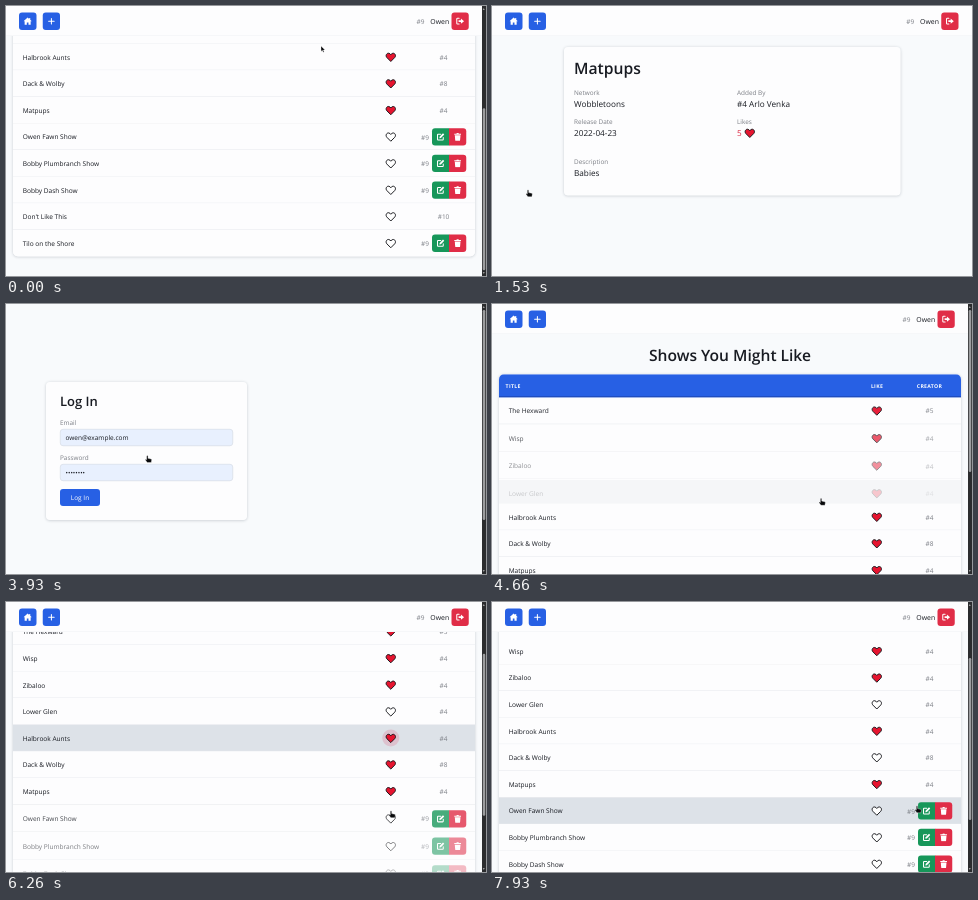
These frames come from a looping animation (480x270 px, 8000 ms). An HTML page:

```html
<!DOCTYPE html>
<html lang="en">
<head>
<meta charset="utf-8">
<title>Shows</title>
<style>
  html, body { margin: 0; width: 100%; height: 100%; overflow: hidden; }
  #stage { position: relative; width: 480px; height: 270px; overflow: hidden; background: #f8fafc; }
  /* Laid out large and shrunk, so that edges and glyphs keep fractional positions. */
  #scene { left: 0; top: 0; width: 480px; height: 270px; zoom: 4; transform: scale(.25); transform-origin: 0 0;
    font-family: "Open Sans", "Noto Sans", sans-serif; color: #181b22; text-rendering: geometricPrecision; }
  #stage div, #stage span, #stage svg { position: absolute; box-sizing: border-box; }
  #stage span { white-space: nowrap; line-height: 1; transform: translateY(-50%); }
  #stage span.mid { transform: translate(-50%, -50%); }
  .page { inset: 0; }
  .grey { color: #7b7e85; }
  .strong { font-weight: 600; }
  .head { color: #fff; font-weight: 700; letter-spacing: .3px; }
  #header { left: 0; top: 0; width: 100%; height: 30px; background: #fdfdfe;
    border-bottom: .5px solid #eef0f3; box-shadow: 0 .4px 1.5px rgba(0, 0, 0, .05); }
  .btn { width: 17.3px; height: 17.3px; border-radius: 3px; color: #fff; }
  .btn svg { left: 4.5px; top: 4.5px; width: 8.3px; height: 8.3px; }
  .blue { background: #2760e4; }
  .red { background: #e02d47; }
  .green { background: #17975a; }
  #logout.hot { background: #ae213b; box-shadow: 0 0 0 1px rgba(225, 45, 70, .4); }
  #tip { left: 445.5px; top: 23.3px; width: 25px; height: 11.2px; border-radius: 2px; background: #0b0e1a; }
  .card { background: #fdfdfe; border-radius: 4px; box-shadow: 0 .5px 3px rgba(20, 30, 50, .22); }
  #table { left: 7px; top: 70.3px; width: 462px; height: 342.2px; border-radius: 5px; overflow: hidden; }
  #thead { left: 0; top: 0; width: 462px; height: 23px; background: #2760e4; border-bottom: 1px solid #1c47b4; }
  .row { left: 0; width: 462px; height: 26.6px; background: #fdfdfe; border-bottom: .5px solid #e4e7eb; }
  .row.hover { background: #dde2e8; }
  .ring { left: 369.3px; top: 4.9px; width: 17px; height: 17px; border-radius: 50%; background: rgba(225, 29, 72, .16); }
  .heart { width: 10.6px; height: 10.6px; overflow: visible; }
  .heart path { stroke: #15161a; stroke-width: 2.2; stroke-linejoin: round; }
  .field { background: #fff; border: .6px solid #ccd2da; border-radius: 3px; }
  .field.filled { background: #e8f0fe; }
  #track { right: 0; top: 0; width: 4px; height: 270px; background: #2b2c2e; }
  #track i { position: absolute; left: .8px; top: 2px; border: 1.2px solid transparent; border-top: 0; border-bottom: 2px solid #a0a0a0; }
  #track i + i { top: auto; bottom: 2px; border-bottom: 0; border-top: 2px solid #a0a0a0; }
  #thumb { left: .8px; width: 2.4px; border-radius: 1.2px; background: #9c9d9f; }
  #cursor { left: 0; top: 0; width: 8px; height: 10px; overflow: visible; }
  #cursor path { fill: #08090b; stroke: #fff; stroke-width: .35; }
</style>
</head>
<body>
<div id="stage"><div id="scene"></div></div>
<script>
const LOOP = 8000, FRAME = 1000 / 15, PITCH = 26.6, FIRST = 93.3;
const DETAIL = 1500, LOGIN = 3200, LIST = 4270;
const FADES = [LIST, 5235, 7850], FADE_TIME = 420, STAGGER = 100;

// title, creator, liked, owned by the visitor, time of unliking
const shows = [
  ["The Hexward", 5, 1], ["Wisp", 4, 1], ["Zibaloo", 4, 1], ["Lower Glen", 4, 1, 0, FADES[1]],
  ["Halbrook Aunts", 4, 1], ["Dack & Wolby", 8, 1, 0, FADES[2]], ["Matpups", 4, 1],
  ["Owen Fawn Show", 9, 0, 1], ["Bobby Plumbranch Show", 9, 0, 1], ["Bobby Dash Show", 9, 0, 1],
  ["Don't Like This", 10, 0], ["Tilo on the Shore", 9, 0, 1]
];

// time, x, y of the pointer tip
const pointerPath = [
  [0, 315, 40], [60, 315, 40], [450, 305, 201], [1000, 305, 201], [1400, 36, 184], [1560, 36, 184],
  [1800, 95, 186], [2550, 462, 14.5], [3150, 462, 14.5], [3600, 180, 131], [3800, 180, 131],
  [4130, 72, 189], [4270, 72, 189], [4660, 329, 194.5], [5000, 384, 186], [5230, 384, 186],
  [5550, 385, 209], [6420, 385, 209], [6850, 386, 163], [7300, 386, 163], [7920, 425, 204]
];
const scrollPath = [[0, 162], [560, 162], [1040, 81], [4260, 81], [LIST, 0], [5650, 0],
  [5800, 21.7], [6060, 64], [6380, 84]];
// Hover is only refreshed now and then while the page scrolls.
const hoverScroll = [[0, 162], [500, 142], [1040, 81], [LIST, 0], [6380, 84]];
const arrowSpans = [[0, 400], [1560, 2480], [3250, 3550], [4300, 4400]];

const text = (x, y, size, str, cls = "") =>
  `<span class="${cls}" style="left:${x}px;top:${y}px;font-size:${size}px">${str.replace("&", "&amp;")}</span>`;
const box = (x, y, w, h, cls, inner = "", id = "") =>
  `<div id="${id}" class="${cls}" style="left:${x}px;top:${y}px;width:${w}px;height:${h}px">${inner}</div>`;
const icons = {
  home: '<path fill="currentColor" d="M8 1 0 8.2h2.2V15h4.2v-4.6h3.2V15h4.2V8.2H16L13 5.5V2h-2v1.7z"/>',
  plus: '<path d="M8 2.7v10.6M2.7 8h10.6" stroke="currentColor" stroke-width="2" stroke-linecap="round"/>',
  exit: '<path d="M6 2.5H3Q1.5 2.5 1.5 4v8q0 1.5 1.5 1.5h3" fill="none" stroke="currentColor" stroke-width="2" stroke-linecap="round"/><path fill="currentColor" d="M5 6.3h4.5V3L15.5 8l-6 5V9.7H5z"/>',
  edit: '<path d="M8 3H3Q2 3 2 4v9q0 1 1 1h9q1 0 1-1V9" fill="none" stroke="currentColor" stroke-width="2" stroke-linecap="round"/><path fill="currentColor" d="M6 7.5 12.500 1 15 3.500 8.500 10 5.500 10.500z"/>',
  trash: '<path fill="currentColor" d="M1.5 2H5.5L6.5.5h3l1 1.5h4v2h-13zM2.5 5h11l-.8 9.5q-.1 1-1.2 1h-7q-1.1 0-1.2-1z"/>'
};
const button = (x, y, color, icon, id = "", style = "") =>
  `<div id="${id}" class="btn ${color}" style="left:${x}px;top:${y}px;${style}"><svg viewBox="0 0 16 16">${icons[icon]}</svg></div>`;
const heart = (cx, cy, red) =>
  `<svg class="heart" viewBox="0 0 24 24" style="left:${cx - 5.3}px;top:${cy - 5.3}px"><path fill="${red ? "#e6142f" : "#fff"}" d="M12 21.5 3.2 12.7C-1 8 3 2 7.3 2.8 9.5 3.1 11 4.5 12 6.2c1-1.7 2.5-3.1 4.7-3.4C21 2 25 8 20.8 12.7z"/></svg>`;

const rowHtml = ([title, by, liked, own], i) => `<div class="row" style="top:${23 + i * PITCH}px">
  ${text(9.7, 13.5, 6.55, title)}<div class="ring"></div>${heart(377.7, 13.6, liked)}
  ${text(own ? 412 : 430.5, 13.5, 6.5, "#" + by, "grey mid")}
  ${own ? button(419, 4.7, "green", "edit", "", "border-radius:3px 0 0 3px") +
    button(436, 4.7, "red", "trash", "", "border-radius:0 3px 3px 0") : ""}</div>`;

const labelled = (x, y, label, value) => text(x, y, 6.4, label, "grey") + text(x, y + 11.6, 8.2, value);
const field = (y, label, id) => text(54, y - 6, 6.4, label, "grey") +
  box(54, y, 173, 17, "field", text(5, 8, 6.5, ""), id);

document.getElementById("scene").innerHTML = `
  <div class="page" id="list"><div class="page" id="scroller">
    ${text(238, 51.4, 15.6, "Shows You Might Like", "mid strong")}
    <div class="card" id="table">${shows.map(rowHtml).join("")}
      <div id="thead">${text(6.6, 11.7, 5.2, "TITLE", "head")}${text(378, 11.7, 5.2, "LIKE", "head mid")}${text(430.5, 11.7, 5.2, "CREATOR", "head mid")}</div>
    </div></div></div>
  <div class="page" id="detail">
    ${box(72, 41, 336.5, 148.5, "card")}
    ${text(82, 62, 15.7, "Matpups", "strong")}
    ${labelled(82, 86.3, "Network", "Wobbletoons")}${labelled(245, 86.3, "Added By", "#4 Arlo Venka")}
    ${labelled(82, 115.8, "Release Date", "2022-04-23")}${text(245, 115.8, 6.4, "Likes", "grey")}
    <span style="left:245px;top:127.4px;font-size:8.2px;color:#dc2640">5</span>${heart(257.8, 127.3, 1)}
    ${labelled(82, 155.6, "Description", "Babies")}
  </div>
  <div class="page" id="login">
    ${box(40, 78, 201, 138, "card")}
    ${text(54, 97, 13, "Log In", "strong")}
    ${field(125, "Email", "email")}${field(160, "Password", "password")}
    ${box(54, 185, 40, 17, "btn blue", text(20, 8.5, 6.5, "Log In", "mid"))}
  </div>
  <div id="header">
    ${button(13.1, 6.6, "blue", "home")}${button(36.8, 6.6, "blue", "plus")}
    <div id="account">${text(410.5, 15.3, 6.5, "#9", "grey")}${text(424.3, 15.3, 6.9, "Owen")}${button(445.4, 6.6, "red", "exit", "logout")}</div>
  </div>
  <div id="tip">${text(12.5, 5.5, 4.7, "Log Out", "mid head")}</div>
  <div id="track"><i></i><i></i><div id="thumb"></div></div>
  <svg id="cursor" viewBox="0 0 8 10">
    <path id="arrow" d="M0 0v5.4l1.3-1.1.9 2 1-.4-.9-1.9h1.7z"/>
    <path id="hand" d="M-.7.3Q0-.6.7.3V2.6l3 .7q.7.2.6 1L3.9 6.8H-.1L-2 4.3q-.2-.8.6-.7l.7.5z"/>
  </svg>`;

const $ = id => document.getElementById(id);
const rows = [...document.querySelectorAll(".row")].map(el => ({
  el, ring: el.querySelector(".ring"), fill: el.querySelector(".heart path")
}));
const show = (el, on) => { el.style.display = on ? "" : "none"; };
const smooth = p => p * p * (3 - 2 * p);
const linear = p => p;
const latest = (table, t) => table.filter(k => k[0] <= t).pop();

function sample(path, t, ease) {
  const next = path.findIndex(k => k[0] > t);
  if (next < 0) return path[path.length - 1].slice(1);
  const a = path[next - 1], b = path[next], p = ease((t - a[0]) / (b[0] - a[0]));
  return a.slice(1).map((v, i) => v + (b[i + 1] - v) * p);
}

function drawRows(t, x, y) {
  const start = FADES.filter(s => s <= t).pop();
  const hovered = t > 200 && y > 30 ? Math.floor((y + latest(hoverScroll, t)[1] - FIRST) / PITCH) : -1;
  rows.forEach(({ el, ring, fill }, i) => {
    const age = start === undefined ? -1 : t - start - STAGGER * i;
    const p = age >= 0 && age < FADE_TIME ? age / FADE_TIME : 1;
    const [, , liked, , unliked] = shows[i];
    el.style.opacity = p;
    el.style.transform = p < 1 ? `translateY(${3.8 * (1 - p)}px)` : "";
    el.classList.toggle("hover", i === hovered);
    show(ring, i === hovered && Math.abs(x - 385) < 7);
    fill.setAttribute("fill", liked && !(t >= unliked) ? "#e6142f" : "#fff");
  });
}

function draw(t) {
  const page = t < DETAIL || t >= LIST ? "list" : t < LOGIN ? "detail" : "login";
  const [x, y] = sample(pointerPath, t, smooth);
  const [scroll] = sample(scrollPath, t, linear);
  for (const id of ["list", "detail", "login"]) show($(id), id === page);

  if (page === "list") drawRows(t, x, y);
  $("scroller").style.transform = `translateY(${-scroll}px)`;

  show($("header"), page !== "login");
  $("account").style.left = page === "detail" ? "3.8px" : "0";
  $("logout").classList.toggle("hot", page === "detail" && t > 2480);
  show($("tip"), page === "detail" && t > 2670);

  show($("track"), page !== "detail");
  $("thumb").style.top = (page === "list" ? 6 + scroll * .594 : 6) + "px";
  $("thumb").style.height = (page === "list" ? 162 : 210) + "px";

  const filled = t >= 3800;
  $("email").classList.toggle("filled", filled);
  $("password").classList.toggle("filled", filled);
  $("email").firstChild.textContent = filled ? "owen@example.com" : "";
  $("password").firstChild.textContent = filled ? "••••••••" : "";

  const arrow = arrowSpans.some(([from, to]) => t >= from && t < to);
  show($("arrow"), arrow);
  show($("hand"), !arrow);
  $("cursor").style.transform = `translate(${x}px, ${y}px)`;
}

const begin = performance.now();
function tick() {
  const t = (performance.now() - begin) % LOOP;
  draw(Math.floor((t + 7) / FRAME) * FRAME % LOOP);
  requestAnimationFrame(tick);
}
tick();
</script>
</body>
</html>
```
